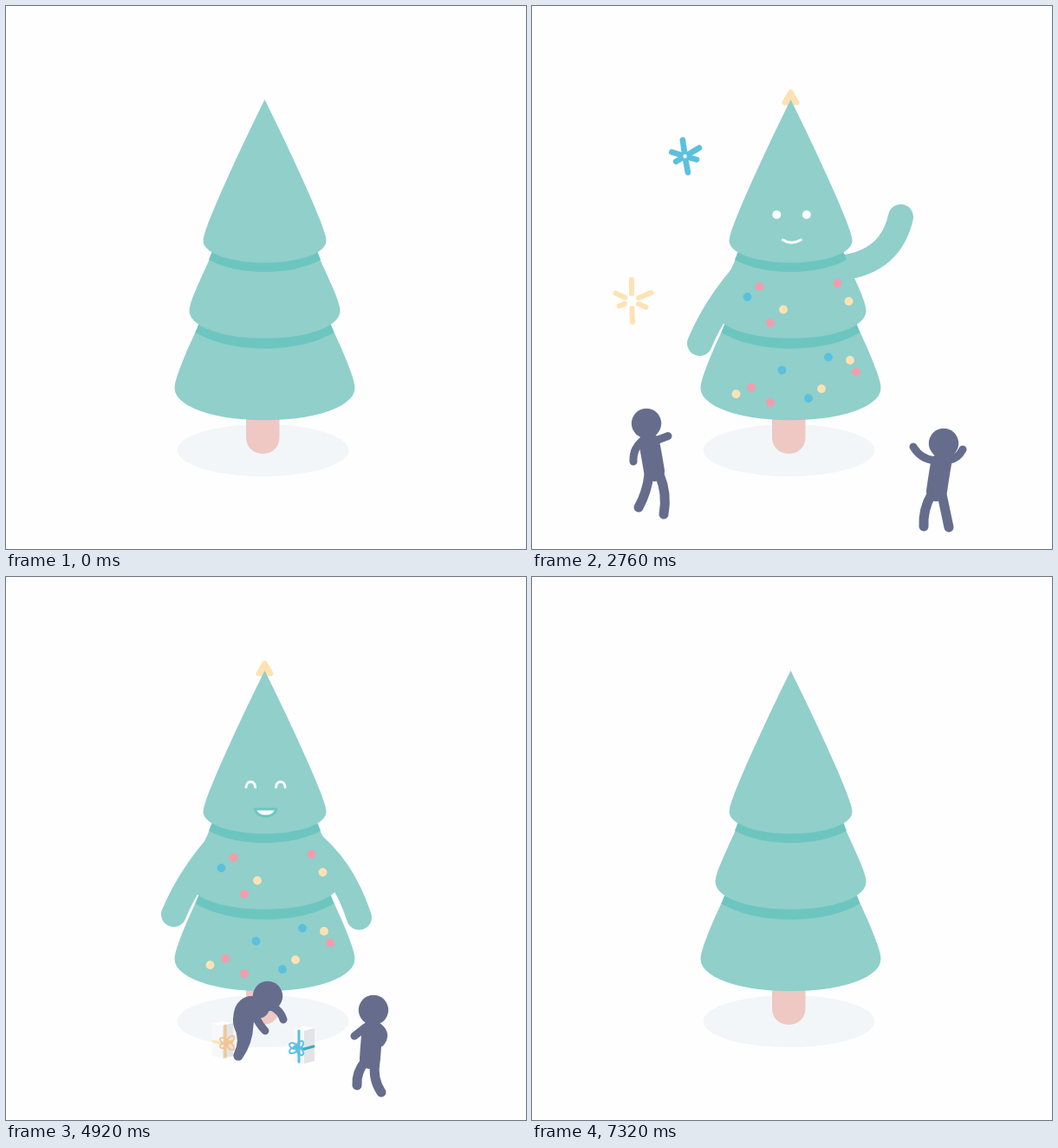
Recreate the animation shown at these times as an HTML page. Size 600 px wide and 627 px high, loop 8.52 s.

```html
<!DOCTYPE html>
<html lang="en">
<head>
<meta charset="utf-8">
<title>Dancing tree</title>
<style>
  html, body { margin: 0; width: 100%; height: 100%; overflow: hidden; background: #fefefe; }
  svg { display: block; width: 100vw; height: 100vh; }
</style>
</head>
<body>
<svg id="stage" viewBox="0 0 600 627" fill="none" stroke-linecap="round" stroke-linejoin="round"></svg>
<script>
const LOOP = 8520, MOVING = 7320, STEP = 40;
const LEAF = '#90cfca', BAND = '#6dc5c0', NAVY = '#666d8c', WHITE = '#fefefe';
const BLUE = '#5bc0de', PINK = '#f49cac', YELLOW = '#ffe2b4';
const CX = 298.5, GROUND = 517;

const clamp = v => Math.max(0, Math.min(1, v));
const mix = (a, b, k) => a + (b - a) * k;
const smooth = k => k * k * (3 - 2 * k);
const span = (t, from, to) => clamp((t - from) / (to - from));
const pop = k => k <= 0 ? 0 : k >= 1 ? 1 : 1 + 2.7 * (k - 1) ** 3 + 1.7 * (k - 1) ** 2;
const fix = v => +v.toFixed(2);

function keyed(keys, t) {
  if (t <= keys[0][0]) return keys[0][1];
  const i = keys.findIndex(k => k[0] > t);
  if (i < 0) return keys[keys.length - 1][1];
  const [a, b] = [keys[i - 1], keys[i]];
  return mix(a[1], b[1], smooth(span(t, a[0], b[0])));
}

const circle = (x, y, r, fill) => `<circle cx="${fix(x)}" cy="${fix(y)}" r="${fix(Math.max(0, r))}" fill="${fill}"/>`;
const fill = (d, color) => `<path d="${d}" fill="${color}"/>`;
const line = (d, color, w) => `<path d="${d}" stroke="${color}" stroke-width="${fix(w)}"/>`;
const place = (x, y, rot, s, body) =>
  `<g transform="translate(${fix(x)} ${fix(y)}) rotate(${fix(rot)}) scale(${fix(s)})">${body}</g>`;

// ---- tree ----
const LEAN = [[0, 0], [440, -0.8], [1120, 1], [1200, 1], [1540, -0.5], [1760, 0]];
const STRETCH = [[1540, 1], [1640, 0.97], [1840, 1.09], [2040, 0.975], [2200, 1],
  [3680, 1], [3840, 0.975], [4040, 1], [4480, 1], [4600, 0.98], [4760, 1]];

function makeWarp(t) {
  const lean = keyed(LEAN, t), stretch = keyed(STRETCH, t);
  return (x, y) => {
    const u = Math.max(0, (GROUND - y) / 409);
    return [x + lean * 22 * (u ** 1.5 + u ** 8),
      GROUND - (GROUND - y) * stretch + lean * 0.05 * (x - CX) * clamp(u * 6) * (y < 120 ? 0 : 1)];
  };
}

// Bends a chain of lines and cubics by sampling it.
function bent(warp, start, segs) {
  let [px, py] = start;
  const pts = [start];
  for (const s of segs) {
    if (s.length === 2) pts.push(s);
    else for (let i = 1; i <= 14; i++) {
      const k = i / 14, m = 1 - k;
      const at = (p, j) => m ** 3 * p + 3 * m * m * k * s[j] + 3 * m * k * k * s[j + 2] + k ** 3 * s[j + 4];
      pts.push([at(px, 0), at(py, 1)]);
    }
    [px, py] = s.slice(-2);
  }
  return 'M' + pts.map(p => warp(...p).map(fix).join(' ')).join('L') + 'Z';
}

function tier(warp, top, topY, h1, y1, h2, y2, half, side, bottom) {
  const low = mix(side, bottom, 0.58), l = h => CX - h, r = h => CX + h;
  return fill(bent(warp, [l(top), topY], [
    [l(h1), y1, l(h2), y2, l(half), side],
    [l(half), low, l(half * 0.56), bottom, CX, bottom],
    [r(half * 0.56), bottom, r(half), low, r(half), side],
    [r(h2), y2, r(h1), y1, r(top), topY]]), LEAF);
}

function band(warp, top, topY, half, y, bottom) {
  const mid = mix(y, bottom, 0.65);
  return fill(bent(warp, [CX - top, topY], [[CX - half, y],
    [CX - half * 0.74, mid, CX - half * 0.4, bottom, CX, bottom],
    [CX + half * 0.4, bottom, CX + half * 0.74, mid, CX + half, y],
    [CX + top, topY]]), BAND);
}

const LIGHTS = [
  [262.5, 324, PINK], [248.5, 336, BLUE], [290, 350.5, YELLOW], [275, 366, PINK], [352.5, 320, PINK],
  [365.5, 341, YELLOW], [342, 405.5, BLUE], [367, 409, YELLOW], [374, 422.5, PINK], [288.5, 420.5, BLUE],
  [235.5, 448, YELLOW], [253, 440.5, PINK], [275, 458, PINK], [334, 442, YELLOW], [319, 453, BLUE]];

function lights(t, warp) {
  const r = mix(5.9, 4.9, smooth(span(t, 1300, 1700)));
  return LIGHTS.map(([x, y, color], i) => {
    const size = pop(span(t, 620 + i * 20, 860 + i * 20)) * (1 - span(t, 7040 + i * 8, 7200 + i * 8));
    return size > 0 ? circle(...warp(x, y), r * size, color) : '';
  }).join('');
}

function face(t, warp) {
  const size = pop(span(t, 1800, 2000)) * (1 - smooth(span(t, 6640, 6840)));
  if (size <= 0) return '';
  const happy = t >= 4040;
  const eye = x => place(...warp(x, 241), 0, size, happy
    ? line('M-5.3 1.8C-5 -6.5 5 -6.5 5.3 1.8', WHITE, 3) : circle(0, 0, 5, WHITE));
  const mouth = happy
    ? `<path d="M-12 -3H12.5C11 8 -10 8 -12 -3Z" fill="${WHITE}" stroke="${BAND}" stroke-width="3"/>`
    : line('M-10 -1Q0 5.5 11 -1', WHITE, 3);
  return eye(282.3) + eye(316.8) + place(...warp(299.3, 271), 0, size, mouth);
}

// Each pose: bend point, then hand.
const LEFT_ARM = [[213, 343, 193.5, 389.5], [215, 333, 185.5, 333], [203, 322, 163, 271]];
const RIGHT_ARM = [[388, 334, 407.5, 393], [410, 330, 428, 325], [413, 300, 425.5, 243.5]];
const LEFT_LIFT = [[5120, 0], [5480, 2], [5720, 1.1], [5860, 1.7], [6000, 1], [6200, 1.9], [6480, 0]];
const RIGHT_LIFT = [[2480, 1.6], [2760, 2], [2960, 1.6], [3160, 2], [3400, 2], [3640, 0]];

function arm(poses, lift, grow, shoulder, warp) {
  if (grow <= 0) return '';
  const i = Math.min(1, Math.floor(lift));
  const p = poses[i].map((v, j) => mix(shoulder[j % 2], mix(v, poses[i + 1][j], lift - i), grow));
  return line(`M${warp(...shoulder)}Q${warp(p[0], p[1])} ${warp(p[2], p[3])}`, LEAF, 29);
}

function tree(t) {
  const warp = makeWarp(t);
  const grow = smooth(span(t, 2120, 2400)) * (1 - smooth(span(t, 6760, 7160)));
  const star = pop(span(t, 1560, 1800)) * (1 - smooth(span(t, 6880, 7120)));
  return `<ellipse cx="296.5" cy="513" rx="99" ry="30" fill="#f2f6f8"/>` +
    fill(bent(warp, [277, 465], [[277, 498], [277, 523.3, 315.5, 523.3, 315.5, 498], [315.5, 465]]), '#efc7c3') +
    arm(LEFT_ARM, keyed(LEFT_LIFT, t), grow, [251, 302], warp) +
    arm(RIGHT_ARM, keyed(RIGHT_LIFT, t), grow, [347, 303], warp) +
    tier(warp, 76, 368, 84, 385, 104, 428, 104, 441, 478.3) +
    band(warp, 76, 367, 80, 377, 395.5) +
    tier(warp, 61, 286, 70, 308, 87, 340, 87, 352, 383.7) +
    band(warp, 61, 284, 64.5, 293, 307) +
    (star > 0 ? place(...warp(298.5, 113), keyed(LEAN, t) * 20, star,
      `<path d="M0 -13.5L-7 -1.5H7Z" fill="${YELLOW}" stroke="${YELLOW}" stroke-width="6"/>`) : '') +
    tier(warp, 0, 108, 13.5, 135, 71.5, 255, 71, 271, 296.3) +
    lights(t, warp) + face(t, warp);
}

// ---- people ----
// Offsets from the head as x, y, bow: hip, hands, feet.
const POSE = {
  stand: [4, 54, 0, -23, 36, .3, 25, 46, -.3, -15, 95, -.1, 14, 103, -.15],
  point: [9, 55, 0, -15, 44, .25, 25, 14.5, 0, -9, 97, -.1, 20, 105, -.15],
  stride: [3, 64, 0, -14, 50, .15, 14, 45, -.4, -26, 102, -.25, 19, 102, -.25],
  bend: [-28, 29, .4, -3, 40, .15, 18, 27, -.32, -34, 68, -.25, -34, 69, -.15],
  carry: [8, 46, 0, -17, 34, -.7, 8, 40, 0, -2, 82, .25, 20, 82, .25],
  amble: [-2, 54, 0, -21, 47, -.15, 17, 48, -.2, -23, 87, .22, 15, 101, .05],
  cheer: [-8, 55, 0, -35, 4, -.25, 22, 7, .25, -23, 96, .15, 6, 97, 0],
  cheerHigh: [-6, 58, 0, -38, -6, -.2, 26, -4, .2, -22, 98, .15, 9, 99, 0],
  reach: [-4, 56, 0, -22, 30, 0, 8, 38, -.5, -19, 87, .2, 9, 95, .2],
  wave: [-8, 55, 0, -28, -18, -.2, 6, 40, 0, -22, 89, -.3, -14, 92, -.2]
};
const flipped = p => [0, 6, 3, 12, 9].flatMap(i => [-p[i], p[i + 1], -p[i + 2]]);
POSE.bendLeft = flipped(POSE.bend);

const LEFT_TRACK = [
  [560, -30, 522, 'stand'], [1120, 138, 484, 'stand'], [2100, 138, 484, 'stand'],
  [2320, 132, 482, 'point'], [3000, 132, 482, 'point'], [3640, 207, 465, 'stride'],
  [4400, 290, 468, 'stride'], [4720, 302, 484, 'bend'], [5040, 302, 484, 'bend'],
  [5360, 275, 472, 'carry'], [6000, 209, 474, 'carry'], [6920, -45, 502, 'carry']];
const RIGHT_TRACK = [
  [600, 640, 574, 'amble'], [920, 562, 545, 'amble'], [1160, 514, 524, 'amble'],
  [1800, 503, 518, 'amble'], [2300, 475, 505, 'cheer'], [2520, 473, 503, 'cheerHigh'],
  [2760, 475, 505, 'cheer'], [3000, 473, 503, 'cheerHigh'], [3260, 475, 505, 'cheer'],
  [3520, 473, 503, 'cheerHigh'], [4440, 473, 503, 'cheerHigh'], [4920, 424, 500, 'reach'],
  [5200, 390, 502, 'bendLeft'], [5480, 398, 494, 'reach'], [6000, 483, 482, 'wave'],
  [6920, 650, 520, 'wave']];

function stateAt(track, t) {
  const n = track.findIndex(k => k[0] > t);
  const b = track[n < 0 ? track.length - 1 : n], a = track[n < 0 ? track.length - 1 : Math.max(0, n - 1)];
  const raw = span(t, a[0], b[0] + (a === b ? 1 : 0)), dist = Math.abs(b[1] - a[1]);
  const walking = dist > 40, k = walking ? raw : smooth(raw);
  const pose = POSE[a[3]].map((v, i) => mix(v, POSE[b[3]][i], k));
  if (walking) {
    const swing = Math.sin(raw * Math.PI * Math.max(2, Math.round(dist / 26)));
    pose[9] += 14 * swing;
    pose[12] -= 14 * swing;
    pose[10] -= 4 * Math.abs(swing);
    pose[3] -= 5 * swing;
    pose[6] += 5 * swing;
  }
  return { x: mix(a[1], b[1], k), y: mix(a[2], b[2], k), pose };
}

function limb(x, y, ex, ey, bow, w) {
  const cx = (x + ex) / 2 - (ey - y) * bow, cy = (y + ey) / 2 + (ex - x) * bow;
  return line(`M${fix(x)} ${fix(y)}Q${fix(cx)} ${fix(cy)} ${fix(ex)} ${fix(ey)}`, NAVY, w);
}

function person({ x, y, pose: p }) {
  const [hx, hy, bow] = p, sx = hx * 0.36, sy = hy * 0.36;
  const bx = hx * 0.6 - hy * bow, by = hy * 0.6 + hx * bow;
  return place(x, y, 0, 1,
    limb(hx - 6, hy + 4, p[9], p[10], p[11], 11) + limb(hx + 6, hy + 4, p[12], p[13], p[14], 11) +
    line(`M${fix(sx)} ${fix(sy + 3)}Q${fix(bx)} ${fix(by)} ${fix(hx)} ${fix(hy)}`, NAVY, 24) +
    limb(sx - 8, sy, p[3], p[4], p[5], 9) + limb(sx + 8, sy, p[6], p[7], p[8], 9) +
    circle(0, 0, 17.2, NAVY));
}

// ---- gifts ----
const GIFTS = [
  { from: [236, 414, -14], floor: [250, 535, 0], hold: [-14, 31, 0], pick: [5040, 5340], light: YELLOW, dark: '#f0c590', bar: 3, bow: 6 },
  { from: [330, 345, 12], floor: [344, 541, 0], hold: [13, 38, 7], pick: [5200, 5480], light: BLUE, dark: '#3aaac6', bar: -6, bow: -8 }];

function gift(t, g, who) {
  const size = pop(span(t, 3360, 3560));
  if (size <= 0) return '';
  const fall = span(t, 3640, 4080), bounce = span(t, 4080, 4280);
  const lift = smooth(span(t, ...g.pick));
  const [x, y, rot] = g.from.map((v, i) => {
    const down = mix(v, g.floor[i], i === 1 ? fall * fall : fall);
    return mix(down, g.hold[i] + [who.x, who.y, 0][i], lift);
  });
  const loop = (a) => `<ellipse cx="5" rx="5" ry="3" transform="translate(${g.bow} 3) rotate(${a})" stroke="${g.bow < 0 ? g.light : g.dark}" stroke-width="2"/>`;
  return place(x, y - 18 * Math.sin(Math.PI * bounce), rot, size * mix(1, 0.93, lift),
    fill('M-12 -19L0 -22L12 -20L0 -17Z', '#ffffff') +
    fill('M-12 -19L0 -17V21L-12 18Z', '#f8f8fa') + fill('M0 -17L12 -20V18L0 21Z', '#e3e4e7') +
    line(`M${g.bar} -17V19`, g.bow < 0 ? g.light : g.dark, 3) +
    line('M-11 1L0 4', g.light, 3) + line('M0 4L11 1', g.dark, 3) +
    loop(-50) + loop(50) + loop(-150) + loop(150));
}

// ---- bursts ----
const BURSTS = [[115, 340.5, 2640, YELLOW, 8], [176.5, 173.5, 2680, BLUE, 0], [497, 190, 2840, PINK, 20],
  [66, 236, 2960, PINK, 40], [412, 60, 3040, YELLOW, 15], [470, 350, 3120, BLUE, 5]];

function burst(t, [x, y, start, color, turn]) {
  const k = span(t, start, start + 400);
  if (k <= 0 || k >= 1) return '';
  let rays = '';
  for (let i = 0; i < 6; i++) {
    const a = (i * 60 + turn - 98 + 8 * Math.sin(i * 2)) * Math.PI / 180;
    const reach = [19, 19, 14, 19, 12, 16][i] * (1 + 1.5 * (1 - (1 - Math.max(0, k - 0.2)) ** 2));
    const outer = reach * Math.min(1, k / 0.2), inner = Math.min(outer, 4 + 30 * Math.max(0, k - 0.16) * 1.1);
    const at = r => `${fix(x + r * Math.cos(a))} ${fix(y + r * Math.sin(a))}`;
    rays += line(`M${at(inner)}L${at(outer)}`, color, 8 * (1 - k * 0.85));
  }
  return rays;
}

const stage = document.getElementById('stage');
let shown = -1;

function draw(t) {
  const left = stateAt(LEFT_TRACK, t), right = stateAt(RIGHT_TRACK, t);
  const gone = t >= 6920;
  stage.innerHTML = tree(t) + (gone ? '' :
    gift(t, GIFTS[0], left) + gift(t, GIFTS[1], right) + person(left) + person(right)) +
    BURSTS.map(b => burst(t, b)).join('');
}

const began = performance.now();
function tick() {
  const now = (performance.now() - began) % LOOP;
  const t = Math.min(MOVING, Math.floor(now / STEP) * STEP);
  if (t !== shown) draw(shown = t);
  requestAnimationFrame(tick);
}
tick();
</script>
</body>
</html>
```
